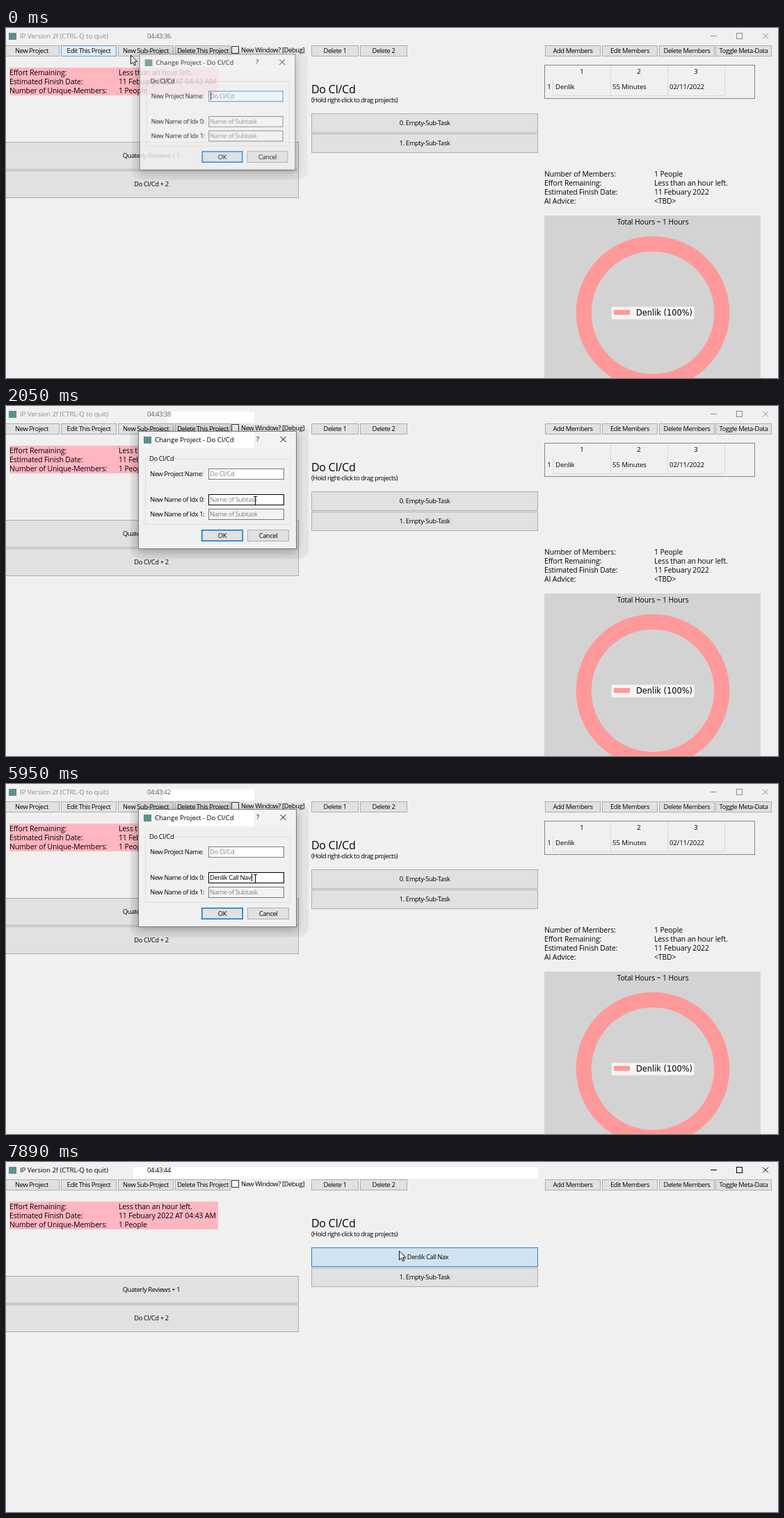
Write an HTML page with a canvas that moves like this. It is 1110 px wide and 504 px high and loops after 8000 ms.

```html
<!DOCTYPE html>
<html lang="en">
<head>
<meta charset="utf-8">
<title>Project planner</title>
<style>
html, body { margin: 0; width: 100%; height: 100%; overflow: hidden; background: #f0f0f0; }
canvas { display: block; }
</style>
</head>
<body>
<canvas id="stage" width="1110" height="504"></canvas>
<script>
const W = 1110, H = 504, LOOP = 8000;
const stage = document.getElementById('stage').getContext('2d');
const layer = Object.assign(document.createElement('canvas'), { width: W, height: H });
const dialog = layer.getContext('2d');
let g = stage;

const MEMBER = 'Denlik', TASK = MEMBER + ' Call Nax';
const SANS = '"Open Sans", "Noto Sans", sans-serif';
const STYLES = {
  ui: { size: 9.4, gap: -0.4 },
  note: { size: 9.4, gap: -0.5, weight: 500 },
  cell: { size: 9.6, gap: -0.1 },
  label: { size: 10.4, gap: -0.1 },
  caption: { size: 9.6, gap: -0.05 },
  heading: { size: 16, gap: -0.3, weight: 500 },
  legend: { size: 11.4, gap: 0, family: '"DejaVu Sans", sans-serif' }
};
const PLAIN = ['#e1e1e1', '#adadad'];
const HOVER = ['#d0e3f0', '#2f7fbf'];
const FADING = ['#dfecf6', '#5f9fd0'];

// Hard-step timelines: [start in ms, value]
const CLOCK = [[0, 36], [1020, 37], [2050, 38], [3020, 39], [4000, 40], [4980, 41], [5950, 42], [6890, 43], [7890, 44]];
const STRIP = [[0, null], [1020, [232, 357]], [4000, [226, 357]], [6760, null], [6890, [183, 430]], [7650, [183, 765]]];
const TYPED = [[0, ''], [2880, 'D'], [3160, 'Dne'], [3290, 'Dnel'], [3440, 'Dne'], [3560, 'Dn'], [3850, 'D'],
  [4000, 'De'], [4120, 'Denl'], [4250, MEMBER], [4400, MEMBER + ' '], [4570, MEMBER + ' C'], [4720, MEMBER + ' Ca'],
  [4850, MEMBER + ' Call'], [4980, MEMBER + ' Call '], [5130, MEMBER + ' Call N'], [5270, MEMBER + ' Call Nav'],
  [6080, MEMBER + ' Call Na'], [6350, TASK]];
const POINTER = [[0, [179, 39]], [120, [268, 62]], [260, [285, 67]], [380, [305, 76]], [510, [330, 92, 'beam']],
  [630, [345, 99, 'beam']], [750, [352, 112]], [890, [357, 132, 'beam']], [1020, [358, 135, 'beam']],
  [1390, [358, 136, 'beam']], [6630, [357, 136]], [7350, [411, 127]], [7500, [526, 110]], [7650, [560, 125]], [7890, [565, 128]]];

const at = (steps, t) => steps.reduce((value, step) => step[0] <= t ? step[1] : value, steps[0][1]);

function fill(x, y, w, h, color) {
  g.fillStyle = color;
  g.fillRect(x, y, w, h);
}

// The far edges x1 and y1 are exclusive.
function box(x0, y0, x1, y1, back, edge, width = 1) {
  if (back) fill(x0, y0, x1 - x0, y1 - y0, back);
  g.strokeStyle = edge;
  g.lineWidth = width;
  g.strokeRect(x0 + width / 2, y0 + width / 2, x1 - x0 - width, y1 - y0 - width);
}

function line(color, ...points) {
  g.strokeStyle = color;
  g.lineWidth = 1;
  g.beginPath();
  points.forEach(([x, y], i) => i ? g.lineTo(x, y) : g.moveTo(x, y));
  g.stroke();
}

function text(str, x, y, style = 'ui', color = '#000', align = 'left') {
  const s = STYLES[style];
  g.font = `${s.weight || 400} ${s.size}px ${s.family || SANS}`;
  g.letterSpacing = s.gap + 'px';
  g.textAlign = align;
  g.fillStyle = color;
  g.fillText(str, x, Math.round(y + s.size * 0.36));
  return g.measureText(str).width;
}

function button(label, x0, y0, x1, y1, [back, edge] = PLAIN) {
  box(x0, y0, x1, y1, back, edge);
  g.save();
  g.beginPath();
  g.rect(x0, y0, x1 - x0, y1 - y0 - 2);
  g.clip();
  text(label, (x0 + x1) / 2, (y0 + y1) / 2, 'ui', '#000', 'center');
  g.restore();
}

function cross(x, y, r, color) {
  line(color, [x - r, y - r], [x + r, y + r]);
  line(color, [x + r, y - r], [x - r, y + r]);
}

function rows(items, x0, x1, y) {
  items.forEach(([name, value], i) => {
    text(name, x0, y + 13 * i, 'label');
    text(value, x1, y + 13 * i, 'label');
  });
}

function drawTitleBar(t) {
  const ink = t < 6760 ? '#8c8c8c' : '#000';
  const strip = at(STRIP, t);
  if (strip) fill(strip[0], 8, strip[1] - strip[0], 16, '#fff');
  fill(4, 7, 11, 10, '#5f8f8c');
  text('IP Version 2f (CTRL-Q to quit)', 20, 12, 'caption', ink);
  text('04:43:' + at(CLOCK, t), 203, 12, 'ui', t < 6760 ? '#666' : '#000');
  line(ink, [1013, 11.5], [1022, 11.5]);
  box(1050, 7, 1059, 16, null, ink);
  cross(1092, 11.5, 4, ink);
}

function drawToolbar(t) {
  [['New Project', -3, 77], ['Edit This Project', 79, 159], ['New Sub-Project', 161, 241],
   ['Delete This Project', 243, 323], ['Delete 1', 439, 507], ['Delete 2', 509, 577],
   ['Add Members', 775, 855], ['Edit Members', 857, 937], ['Delete Members', 939, 1019],
   ['Toggle Meta-Data', 1020, 1101]
  ].forEach(([label, x0, x1], i) => button(label, x0, 25, x1, 41, i === 1 && t < 120 ? FADING : PLAIN));
  box(324, 26, 335, 37, '#f8f8f8', '#333');
  text('New Window? [Debug]', 338, 32);
}

function drawProjects(t) {
  fill(5, 57, 300, 40, '#ffb6c1');
  rows([['Effort Remaining:', 'Less than an hour left.'],
        ['Estimated Finish Date:', '11 Febuary 2022 AT 04:43 AM'],
        ['Number of Unique-Members:', '1 People']], 5, 162, 64);
  button('Quaterly Reviews + 1', -3, 164, 421, 204);
  button('Do CI/Cd + 2', -3, 205, 421, 245);
  text('Do CI/Cd', 439, 88, 'heading');
  text('(Hold right-click to drag projects)', 439, 104, 'note');
  button('0. ' + (t < 6760 ? 'Empty-Sub-Task' : TASK), 439, 123, 765, 151, t < 7650 ? PLAIN : HOVER);
  button('1. Empty-Sub-Task', 439, 152, 765, 180);
}

function drawMetaData() {
  box(774, 53, 1077, 102, '#f0f0f0', '#828790');
  ['1', '2', '3'].forEach((n, i) => {
    text(n, 828 + 82 * i, 63, 'cell', '#000', 'center');
    line('#d8d8d8', [869.5 + 82 * i, 55], [869.5 + 82 * i, 97]);
  });
  line('#d8d8d8', [787, 97.5], [1033, 97.5]);
  line('#d8d8d8', [786.5, 74], [786.5, 97]);
  text('1', 781, 85, 'cell', '#000', 'center');
  [MEMBER, '55 Minutes', '02/11/2022'].forEach((s, i) => text(s, 790 + 82 * i, 85, 'cell'));
  rows([['Number of Members:', '1 People'], ['Effort Remaining:', 'Less than an hour left.'],
        ['Estimated Finish Date:', '11 Febuary 2022'], ['AI Advice:', '<TBD>']], 774, 932, 210);

  fill(774, 270, 311, 234, '#d3d3d3');
  text('Total Hours ~ 1 Hours', 930, 279, 'label', '#000', 'center');
  g.strokeStyle = '#ff9999';
  g.lineWidth = 22;
  g.beginPath();
  g.arc(930, 410, 99.3, 0, 2 * Math.PI);
  g.stroke();
  g.beginPath();
  g.roundRect(870.5, 401.5, 119, 18, 2);
  g.fillStyle = '#f4f4f4';
  g.fill();
  fill(874, 406, 23, 7, '#ff9999');
  text(MEMBER + ' (100%)', 906, 410, 'legend');
}

function field(y, value, placeholder, edge, back, caret) {
  box(291, y, 400, y + 16, back, edge);
  const width = value ? text(value, 293, y + 8) : 0;
  if (!value) text(placeholder, 293, y + 8, 'ui', '#838383');
  if (caret) fill(Math.round(294 + width), y + 2, 1, 11, '#000');
}

function drawDialog(t) {
  g.clearRect(0, 0, W, H);
  g.fillStyle = 'rgba(0,0,0,.05)';
  g.beginPath();
  g.roundRect(179, 26, 256, 194, 14);
  g.fill();
  g.save();
  g.shadowColor = 'rgba(0,0,0,.3)';
  g.shadowBlur = 12;
  g.shadowOffsetY = 3;
  fill(190, 36, 228, 170, '#f0f0f0');
  g.restore();
  box(190, 36, 418, 206, '#f0f0f0', '#7d7d7d');
  fill(191, 37, 226, 24, '#f3f3f3');
  if (t >= 1020 && t < 6630) fill(232, 38, 125, 23, '#fff');
  fill(198, 44, 11, 10, '#5f8f8c');
  text('Change Project - Do CI/Cd', 214, 49, 'caption');
  if (t < 6630) {
    text('?', 362, 48, 'caption', '#000', 'center');
    cross(398.5, 48, 4, '#000');
  }

  line('#dcdcdc', [203, 76.5], [200.5, 76.5], [200.5, 170.5], [408.5, 170.5], [408.5, 76.5], [246, 76.5]);
  text('Do CI/Cd', 206, 76);
  text('New Project Name:', 207, 98);
  text('New Name of Idx 0:', 207, 135);
  text('New Name of Idx 1:', 207, 156);

  const moved = t >= 1390;
  const nameCaret = t < 510 || (t >= 1020 && !moved);
  const taskCaret = moved && (t < 1920 || t >= 2480);
  field(90, '', 'Do CI/Cd', moved ? '#7a7a7a' : '#2b86d0', t < 260 ? '#f3f3f3' : '#fff', nameCaret);
  field(127, at(TYPED, t), 'Name of Subtask', moved ? '#000' : t < 890 ? '#7a7a7a' : '#333',
    t < 890 ? '#f3f3f3' : '#fff', taskCaret);
  field(148, '', 'Name of Subtask', '#7a7a7a', '#f2f2f2');
  button('OK', 281, 178, 341, 195);
  box(281, 178, 341, 195, null, '#0078d7', 1.5);
  button('Cancel', 347, 178, 407, 195);
}

function showDialog(t) {
  g = dialog;
  drawDialog(t);
  g = stage;
  const [scale, alpha] = t < 120 ? [0.985, 0.8] : t < 6760 ? [1, 1] : [0.96, 0.13];
  g.save();
  g.globalAlpha = alpha;
  g.translate(304, 121);
  g.scale(scale, scale);
  g.drawImage(layer, -304, -121);
  g.restore();
}

function drawPointer(t) {
  const [x, y, kind] = at(POINTER, t);
  if (kind) {
    const cx = x + 0.5;
    line('#000', [cx, y - 6], [cx, y + 6]);
    line('#000', [x - 2, y - 5.5], [x + 3, y - 5.5]);
    line('#000', [x - 2, y + 6.5], [x + 3, y + 6.5]);
    return;
  }
  g.beginPath();
  [[0, 0], [0, 13], [3, 10.4], [5, 15], [7, 14], [5, 9.6], [9, 9.3]]
    .forEach(([dx, dy]) => g.lineTo(x + 0.5 + dx, y + dy));
  g.closePath();
  g.fillStyle = '#fff';
  g.fill();
  g.strokeStyle = '#111';
  g.lineWidth = 1;
  g.stroke();
}

function draw(now) {
  const t = now % LOOP;
  fill(0, 0, W, H, '#f0f0f0');
  drawTitleBar(t);
  drawToolbar(t);
  drawProjects(t);
  if (t < 6760) drawMetaData();
  if (t < 6890) showDialog(t);
  drawPointer(t);
}

const start = performance.now();
function tick() {
  draw(performance.now() - start);
  requestAnimationFrame(tick);
}
tick();
</script>
</body>
</html>
```
